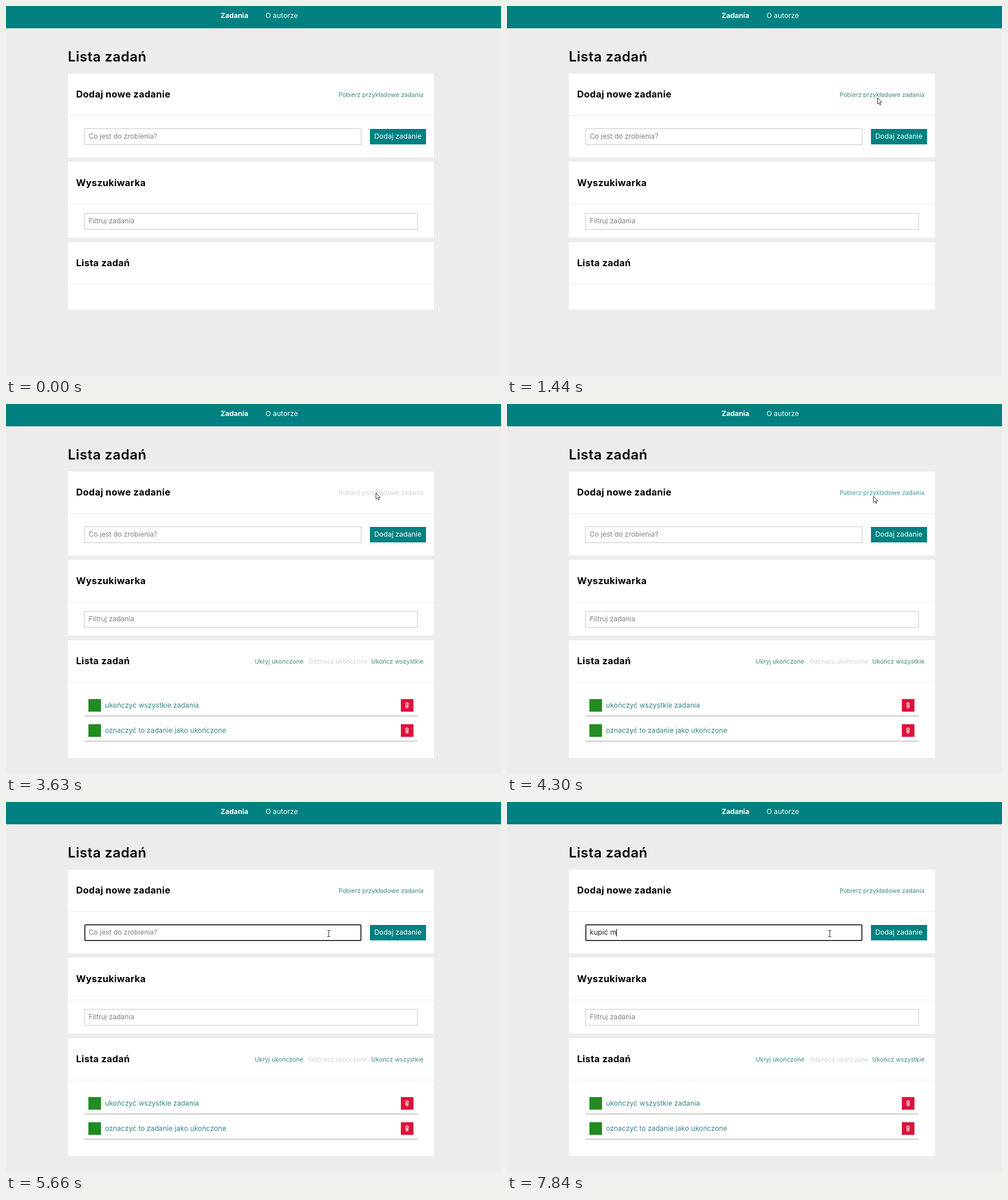
Recreate the animation shown at these times as an HTML page. Size 865x647 px, loop 8000 ms.

```html
<!DOCTYPE html>
<html lang="pl">
<head>
<meta charset="utf-8">
<title>Lista zadań</title>
<style>
  html, body { margin: 0; width: 100%; height: 100%; overflow: hidden; background: #eeeceb; }
  svg { display: block; width: 865px; height: 647px; }
  text { font: 400 12px Montserrat, Inter, "Open Sans", sans-serif; font-optical-sizing: none; white-space: pre; }
  .h1 { font-size: 24px; font-weight: 600; letter-spacing: .5px; }
  .h2 { font-size: 16.3px; font-weight: 700; letter-spacing: .3px; }
  .nav { font-size: 12.3px; fill: #fff; }
  .bold { font-weight: 700; }
  .link { font-size: 10.7px; fill: #3a8888; }
  .off { fill: #d0d0d0; }
  .hint { font-size: 12.1px; fill: #808080; }
  .task { fill: #2f8484; letter-spacing: .1px; }
  .typed { font-size: 12.6px; fill: #222; }
  .end { text-anchor: end; }
  .mid { text-anchor: middle; }
  .card { fill: #fff; stroke: #000; stroke-opacity: .05; }
  .rule { fill: #ececec; }
  .field { fill: #fff; stroke: #c8c8c8; }
</style>
</head>
<body>
<svg id="stage" viewBox="0 0 865 647" xmlns="http://www.w3.org/2000/svg"></svg>
<script>
const NS = 'http://www.w3.org/2000/svg';
const stage = document.getElementById('stage');

function add(tag, attrs, parent = stage) {
  const el = document.createElementNS(NS, tag);
  for (const key in attrs) el.setAttribute(key, attrs[key]);
  return parent.appendChild(el);
}
const rect = (x, y, width, height, attrs, parent) =>
  add('rect', { x, y, width, height, ...attrs }, parent);
function label(x, y, str, cls, parent) {
  const el = add('text', { x, y, class: cls }, parent);
  el.textContent = str;
  return el;
}
function card(y, height, rule, title) {
  const box = rect(107.5, y - .5, 641, height + 1, { class: 'card' });
  rect(108, rule, 640, 1, { class: 'rule' });
  label(122.5, rule - 31.5, title, 'h2');
  return box;
}
const show = (el, on) => el.setAttribute('visibility', on ? 'visible' : 'hidden');
const moveTo = (el, [x, y]) => el.setAttribute('transform', `translate(${x} ${y})`);

// Page
rect(0, 0, 865, 39, { fill: '#008080' });
label(375, 21, 'Zadania', 'nav bold');
label(453.5, 21, 'O autorze', 'nav');
label(108, 97, 'Lista zadań', 'h1');

card(118, 147, 191, 'Dodaj nowe zadanie');
const fetchLink = label(729.5, 158.5, '', 'link end');
const field = rect(137.5, 214.5, 483, 28, { class: 'field' });
const focusRing = rect(137.75, 214.75, 482.5, 27.5, { rx: 1.5, fill: '#fff', stroke: '#000', 'stroke-width': 1.5 });
const hint = label(144.5, 232, 'Co jest do zrobienia?', 'hint');
const typed = label(144.5, 232, '', 'typed');
const caret = rect(0, 222, 1, 13, { fill: '#000' });
rect(636, 215, 98, 27, { fill: '#008080' });
label(684.8, 232, 'Dodaj zadanie', 'nav mid');

card(272, 133, 346, 'Wyszukiwarka');
rect(137.5, 362.5, 581.5, 28, { class: 'field' });
label(144.5, 380, 'Filtruj zadania', 'hint');

const listCard = card(413, 118, 486, 'Lista zadań');

// Task list
const list = add('g', {});
label(519.5, 453.5, 'Ukryj ukończone', 'link end', list);
label(631.5, 453.5, 'Odznacz ukończone', 'link end off', list);
label(729.5, 453.5, 'Ukończ wszystkie', 'link end', list);
['ukończyć wszystkie zadania', 'oznaczyć to zadanie jako ukończone'].forEach((name, i) => {
  const row = add('g', { transform: `translate(0 ${i * 44})` }, list);
  rect(144, 516, 22, 22, { fill: '#228b22' }, row);
  label(173, 530.5, name, 'task', row);
  rect(690, 516, 22, 22, { fill: '#dc143c' }, row);
  add('path', {
    d: 'M697.5 523.8h6.6M699.5 523.3v-1h2.6v1M698.5 524.5l.5 6.8h3.6l.5-6.8M700.1 525.5v4.6M701.5 525.5v4.6',
    fill: 'none', stroke: '#fff', 'stroke-width': .9
  }, row);
  rect(137, 545, 582.5, 1, { fill: '#a0a0a0' }, row);
});

// Pointer
const halo = add('circle', { r: 9.3, fill: '#ff0', 'fill-opacity': .47 });
const arrow = add('path', {
  d: 'M.5 .5V11.3L2.9 9L4.6 13L6.4 12.2L4.7 8.4H8.1Z',
  fill: '#fff', stroke: '#222', 'stroke-width': .9
});
const beam = add('path', {
  d: 'M-2.5 -5.5H-.6L0 -5L.6 -5.5H2.5M0 -5V5M-2.5 5.5H-.6L0 5L.6 5.5H2.5',
  fill: 'none', stroke: '#222', 'stroke-width': 1
});

// Motion
const START = [750, 497], BELOW = [647, 160], LINK = [646, 155], INPUT = [564, 230];
const TEAL = [58, 136, 136], HOVER = [58, 158, 158], PALE = [190, 203, 203], GREY = [208, 208, 208];
const KEYS = [6110, 6450, 6770, 6970, 7430, 7650, 7840];
const PHRASE = 'kupić m';

const mix = (a, b, s) => a.map((v, i) => v + (b[i] - v) * s);
// Progress from 0 to 1 between two times, held in n equal steps.
const stepped = (t, from, to, n) =>
  Math.min(1, Math.max(0, Math.floor((t - from) / (to - from) * n + 1e-6) / n));

function pointer(t) {
  if (t < 1540) {
    const s = 1 - stepped(t, 680, 1440, 10);
    return t < 1480 ? mix(START, BELOW, 1 - s * s) : [647, 158];
  }
  if (t < 4230) return LINK;
  const s = (stepped(t, 4230, 4990, 11) * 11 + 1) / 12;
  return mix(LINK, INPUT, s * s * (3 - 2 * s));
}

function linkColor(t) {
  if (t < 2270) return mix(TEAL, HOVER, stepped(t, 1480, 1670, 3));
  if (t < 3630) return mix(HOVER, PALE, stepped(t, 2270, 2480, 3));
  if (t < 4300) return mix(GREY, HOVER, stepped(t, 3630, 3970, 5));
  return mix(HOVER, TEAL, stepped(t, 4300, 4510, 3));
}

function draw(t) {
  const loading = t >= 2270 && t < 3630;
  fetchLink.textContent = loading ? 'ładowanie...' : 'Pobierz przykładowe zadania';
  fetchLink.style.fill = `rgb(${linkColor(t).map(Math.round)})`;

  const loaded = t >= 3630;
  show(list, loaded);
  listCard.setAttribute('height', loaded ? 207 : 119);

  const focused = t >= 5120;
  const count = KEYS.filter(k => t >= k).length;
  show(field, !focused);
  show(focusRing, focused);
  show(hint, !count);
  typed.textContent = PHRASE.slice(0, count);
  caret.setAttribute('x', Math.round(144.5 + (count ? typed.getComputedTextLength() : 0)));
  show(caret, focused && (t < 5660 || count > 0));

  const pos = pointer(t);
  const overInput = pos[1] > 214 && pos[0] < 621 && t > 4230;
  [halo, arrow, beam].forEach(el => moveTo(el, pos.map(Math.round)));
  show(arrow, t >= 680 && !overInput);
  show(beam, overInput);
  show(halo, (t >= 2070 && t < 2270) || (t >= 5120 && t < 5250));
}

const begin = performance.now();
function tick() {
  draw((performance.now() - begin) % 8000);
  requestAnimationFrame(tick);
}
tick();
</script>
</body>
</html>
```
